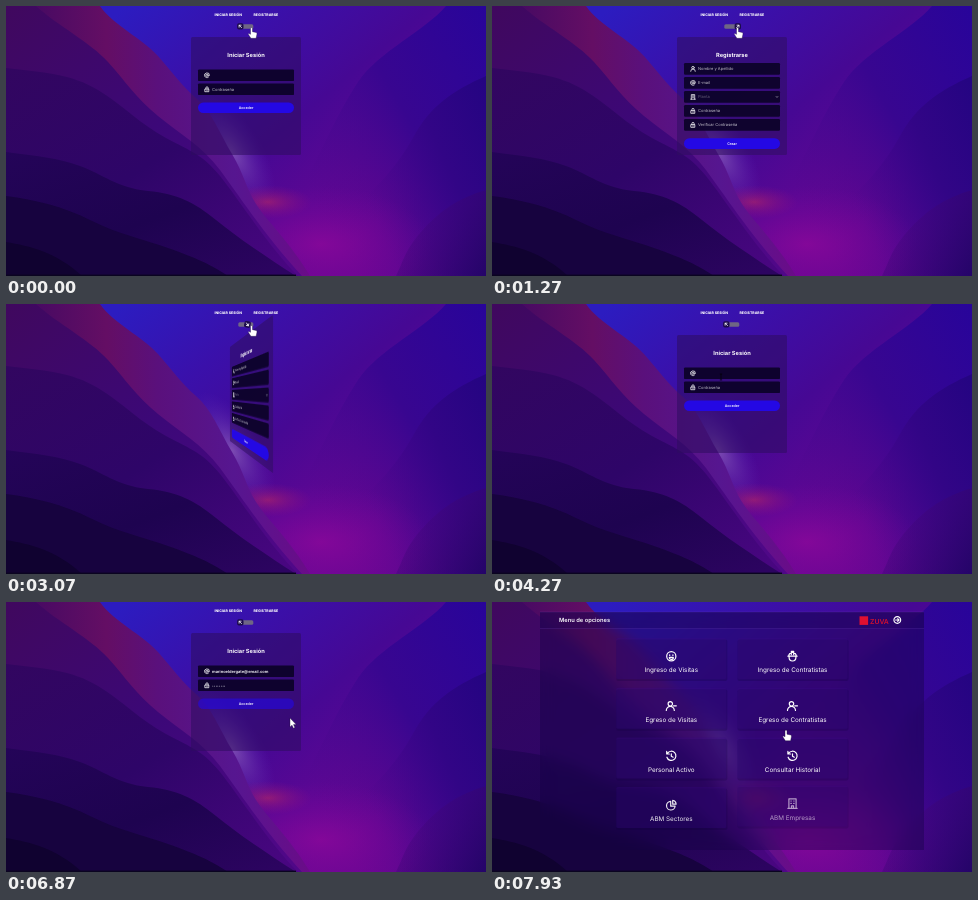
An HTML page that plays this animation: 480x270 px, repeating every 8 s.

```html
<!DOCTYPE html>
<html lang="es">
<head>
<meta charset="utf-8">
<title>Iniciar Sesión</title>
<style>
html, body { margin: 0; width: 100%; height: 100%; overflow: hidden; background: #1a0450; }
body { position: relative; }
svg, div { position: absolute; left: 0; top: 0; }
svg { width: 480px; height: 270px; font-family: Inter, "Open Sans", sans-serif; fill: #fff; text-rendering: geometricPrecision; }
.ic { fill: none; stroke: #fff; stroke-linecap: round; stroke-linejoin: round; }
#deck { left: 185px; top: 31px; width: 110px; height: 118px; perspective: 200px; }
#deck svg { width: 110px; height: 118px; }
#panel { left: 48px; top: 10px; width: 384px; height: 238px; background: rgba(20, 3, 68, .4); backdrop-filter: blur(7px); }
</style>
</head>
<body>
<svg viewBox="0 0 480 270">
  <defs>
    <linearGradient id="sky" gradientUnits="userSpaceOnUse" x1="120" y1="0" x2="330" y2="250">
      <stop offset="0" stop-color="#2c1cc0"/><stop offset=".3" stop-color="#3a10aa"/>
      <stop offset=".6" stop-color="#460894"/><stop offset="1" stop-color="#6c0692"/>
    </linearGradient>
    <linearGradient id="far">
      <stop offset="0" stop-color="#3c0862"/><stop offset=".33" stop-color="#640e64"/>
      <stop offset=".5" stop-color="#5a107c"/><stop offset=".75" stop-color="#561690"/><stop offset="1" stop-color="#6a0c88"/>
    </linearGradient>
    <linearGradient id="mid" x2=".9" y2="1">
      <stop offset="0" stop-color="#40085e"/><stop offset=".5" stop-color="#3c0878"/><stop offset="1" stop-color="#500888"/>
    </linearGradient>
    <linearGradient id="mid2" x2=".9" y2="1">
      <stop offset="0" stop-color="#320660"/><stop offset=".5" stop-color="#2e0568"/><stop offset="1" stop-color="#480680"/>
    </linearGradient>
    <linearGradient id="near" x2=".9" y2="1">
      <stop offset="0" stop-color="#240458"/><stop offset=".55" stop-color="#1e0350"/><stop offset="1" stop-color="#2c0460"/>
    </linearGradient>
    <linearGradient id="right" x1="1" x2=".1" y2=".8">
      <stop offset="0" stop-color="#28049a"/><stop offset=".5" stop-color="#380690"/><stop offset="1" stop-color="#50088e" stop-opacity="0"/>
    </linearGradient>
    <linearGradient id="right2" x1="1" x2=".1" y2=".6">
      <stop offset="0" stop-color="#240482"/><stop offset=".45" stop-color="#320586"/><stop offset="1" stop-color="#4c068c" stop-opacity="0"/>
    </linearGradient>
    <linearGradient id="corner" x1="1" y1="1" x2="0" y2=".4">
      <stop offset="0" stop-color="#240468"/><stop offset="1" stop-color="#48067e" stop-opacity=".2"/>
    </linearGradient>
    <radialGradient id="glow"><stop offset="0" stop-color="#8a5cb8" stop-opacity=".8"/><stop offset="1" stop-color="#5a20b0" stop-opacity="0"/></radialGradient>
    <radialGradient id="pink"><stop offset="0" stop-color="#88089a" stop-opacity=".85"/><stop offset="1" stop-color="#70069a" stop-opacity="0"/></radialGradient>
    <radialGradient id="red"><stop offset="0" stop-color="#b02468" stop-opacity=".65"/><stop offset="1" stop-color="#901080" stop-opacity="0"/></radialGradient>
  </defs>
  <rect width="480" height="270" fill="url(#sky)"/>
  <path d="M480 0H440C420 24 372 46 352 76S318 140 302 170L310 270H480Z" fill="url(#right)"/>
  <path d="M480 70C448 84 424 100 408 130S372 180 345 205L350 270H480Z" fill="url(#right2)"/>
  <ellipse cx="315" cy="238" rx="110" ry="58" fill="url(#pink)"/>
  <ellipse cx="226" cy="146" rx="66" ry="30" fill="url(#glow)" transform="rotate(58 226 146)"/>
  <ellipse cx="262" cy="196" rx="44" ry="17" fill="url(#red)"/>
  <path d="M480 184C452 192 432 206 415 226S398 254 390 270H480Z" fill="url(#corner)"/>
  <path d="M0 0H94C108 20 136 32 152 50S174 78 190 92S214 128 226 148S240 182 250 198S284 236 304 270H0Z" fill="url(#far)"/>
  <path d="M0 0H30C52 20 84 36 102 56S130 92 152 110S196 140 214 164S256 226 296 270H0Z" fill="url(#mid)"/>
  <path d="M0 62C36 66 66 68 92 84S134 118 160 132S196 148 214 170S262 240 292 270H0Z" fill="url(#mid2)"/>
  <path d="M0 146C30 150 52 152 74 160S112 182 142 185S188 196 210 214S262 252 290 270H0Z" fill="url(#near)"/>
  <path d="M0 190C30 194 56 200 84 214S134 232 162 242S204 258 222 270H0Z" fill="#17033f"/>
  <path d="M0 236C24 240 50 246 76 270H0Z" fill="#100230"/>
  <rect y="268.6" width="290" height="1.4" fill="#0a0420"/>
</svg>
<div id="login">
  <svg viewBox="0 0 480 270">
    <g font-size="3.55" font-weight="800" text-anchor="middle">
      <text x="222.2" y="10.4">INICIAR SESIÓN</text><text x="259.8" y="10.4">REGISTRARSE</text>
    </g>
    <rect x="232.3" y="18.3" width="15" height="4.4" rx="1.5" fill="#6f6684"/>
    <g id="knob"><rect x="-3.2" y="-3.2" width="6.4" height="6.4" rx="1.8" fill="#1c0a4c"/>
      <path class="ic" stroke-width=".8" d="M-1.2 1.2L1.2-1.2M-.8-1.2H1.2V.8"/></g>
  </svg>
  <div id="deck"><svg id="front" viewBox="185 31 110 118"></svg><svg id="rear" viewBox="185 31 110 118"></svg></div>
</div>
<div id="menu">
  <div id="panel"></div>
  <svg id="options" viewBox="0 0 480 270"></svg>
</div>
<svg viewBox="0 0 480 270"><g id="cursor"></g></svg>
<script>
const $ = id => document.getElementById(id);
const clamp = v => Math.max(0, Math.min(1, v));
const icon = (d, x, y, w = 1.2) => `<path class="ic" stroke-width="${w}" transform="translate(${x} ${y})" d="${d}"/>`;
const text = (s, x, y, size, more = '') => `<text x="${x}" y="${y}" font-size="${size}" ${more}>${s}</text>`;
const mid = 'text-anchor="middle"';

// Forms
const small = {
  at: 'M1.1 0A1.1 1.1 0 1 1 -1.1 0A1.1 1.1 0 1 1 1.1 0V.5Q1.8 1.4 2.4 0A2.4 2.4 0 1 0 1.2 2.1',
  lock: 'M-1.8-.3H1.8V2.4H-1.8ZM-1.1-.3V-1.4A1.1 1.1 0 0 1 1.1-1.4V-.3M0 .7V1.4',
  user: 'M1.3-1.2A1.3 1.3 0 1 1 -1.3-1.2A1.3 1.3 0 1 1 1.3-1.2M-2.3 2.4A2.3 2.3 0 0 1 2.3 2.4',
  house: 'M-1.7 2.3V-2.3H1.7V2.3M-2.3 2.3H2.3M-.6-1H.6M-.6.3H.6'
};
const field = (y, kind, label, dim = .75, id = '') =>
  `<rect x="192" y="${y}" width="96" height="11.7" rx="1.2" fill="#0b0328" fill-opacity=".93"/>` +
  icon(small[kind], 201, y + 5.9, .75) + text(label, 206, y + 7.3, 4.05, `fill-opacity="${dim}" ${id && `id="${id}"`}`);
const form = (title, fields, y, action) =>
  '<rect x="185" y="31" width="110" height="118" rx="1.5" fill="#2e0e60" fill-opacity=".55"/>' +
  text(title, 240, 51, 5.7, mid + ' font-weight="700"') + fields +
  `<rect class="button" x="192" y="${y}" width="96" height="10.6" rx="5.3" fill="#2408e4"/>` +
  text(action, 240, y + 6.5, 3.6, mid + ' font-weight="600"');

$('front').innerHTML = form('Iniciar Sesión',
  field(63.4, 'at', '', 1, 'mail') + field(77.4, 'lock', 'Contraseña', .75, 'pass'), 96.4, 'Acceder');
$('rear').innerHTML = form('Registrarse',
  field(57, 'user', 'Nombre y Apellido') + field(71, 'at', 'E-mail') + field(85, 'house', 'Planta', .35) +
  field(99, 'lock', 'Contraseña') + field(113, 'lock', 'Verificar Contraseña') +
  icon('M-.8-.4L0 .4L.8-.4', 285, 91, .5), 132.3, 'Crear');
$('mail').setAttribute('font-weight', 600);

// Menu
const person = 'M1.2-2.2A2.2 2.2 0 1 1 -3.2-2.2A2.2 2.2 0 1 1 1.2-2.2M-5 4.4A4 4 0 0 1 3 4.4M2.2-.2H5';
const clock = 'M-3.8-2.6A4.6 4.6 0 1 1 -4.4 1.4M-4.6-4.4V-1.8H-2M0-2V.4L1.8 1.4';
const items = [
  ['Ingreso de Visitas', 'M4.6 0A4.6 4.6 0 1 1 -4.6 0A4.6 4.6 0 1 1 4.6 0M-1.6-1.4V-.8M1.6-1.4V-.8M-2 1.2H2A2 2 0 0 1 -2 1.2'],
  ['Ingreso de Contratistas', 'M-4.6 0H4.6M-3.8 0A3.8 3.8 0 0 1 3.8 0M-3.4 0V1.4A3.4 3.4 0 0 0 3.4 1.4V0M-1.2-1.6V-4.8H1.2V-1.6'],
  ['Egreso de Visitas', person],
  ['Egreso de Contratistas', person],
  ['Personal Activo', clock],
  ['Consultar Historial', clock],
  ['ABM Sectores', 'M-.6-3.8A4.3 4.3 0 1 0 3.8 1H-.6ZM1.4-4.8A4 4 0 0 1 4.8-1H1.4Z'],
  ['ABM Empresas', 'M-3.6 4.8V-4.8H3.6V4.8M-4.6 4.8H4.6M-1.6-2.6H-1.2M1.2-2.6H1.6M-1.6-.2H-1.2M1.2-.2H1.6M-1 4.8V2.2H1V4.8']
];
$('options').innerHTML =
  '<rect x="48" y="10" width="384" height="16.5" fill="#1c0558" fill-opacity=".3"/>' +
  '<path d="M48 26.5H432M48 10H432" stroke="#7a50c0" stroke-opacity=".3" stroke-width=".6"/>' +
  text('Menu de opciones', 67, 20, 5.75, 'font-weight="600"') +
  '<rect x="367.5" y="14.3" width="8.6" height="8.6" fill="#e01030"/>' +
  text('ZUVA', 378, 22.2, 6.8, 'fill="#d01030" font-weight="600"') +
  icon('M3.4 0A3.4 3.4 0 1 1 -3.4 0A3.4 3.4 0 1 1 3.4 0M-1.7 0H1.7M.4-1.4L1.8 0L.4 1.4', 405.3, 18, 1.1) +
  items.map(([label, d], i) => {
    const x = i % 2 ? 300.5 : 179.3, y = 36 + 49.8 * (i >> 1);
    return '<g class="item">' +
      `<rect x="${x - 55}" y="${y + 1.5}" width="111" height="41.5" rx="2" fill="#10023c" fill-opacity=".22"/>` +
      `<rect x="${x - 55}" y="${y}" width="110" height="41" rx="1.5" fill="#3a0c86" fill-opacity=".3"/>` +
      icon(d, x, y + 18.2) + text(label, x, y + 34.4, 6.35, mid) + '</g>';
  }).join('');
const cards = [...document.querySelectorAll('.item')];
const button = document.querySelector('#front .button');

// Pointer shapes, hot spot at 0,0
const shapes = {
  hand: '<path fill="#fff" stroke="#201040" stroke-width=".4" d="M-1 .8Q0-.6 1 .8V4.2L4.8 5Q5.8 5.4 5.4 7L4.6 10.8H-.6L-3.2 6.8Q-3.2 5.4-1 6.8Z"/>',
  arrow: '<path fill="#fff" stroke="#201040" stroke-width=".4" d="M0 0V9L2 7.2L3.4 10.3L4.9 9.6L3.5 6.6H6.2Z"/>',
  beam: '<path fill="none" stroke="#000" stroke-width=".6" d="M-1.2-3H1.2M0-3V3M-1.2 3H1.2"/>'
};
const track = [
  [0, 245.5, 21.5, 'hand'], [3560, 245.5, 21.5, 'arrow'], [3720, 240, 45, 'arrow'], [3860, 229, 73, 'beam'],
  [4700, 229, 73, 'beam'], [4900, 222, 82, 'beam'], [5450, 219, 85, 'arrow'], [5800, 219, 85, 'arrow'],
  [6200, 242, 101, 'hand'], [6450, 242, 101, 'arrow'], [6800, 284, 116, 'arrow'], [7150, 284, 116, 'arrow'],
  [7500, 294, 128, 'hand'], [8000, 294, 128, 'hand']
];

// CSS ease-out
function easeOut(x) {
  let lo = 0, hi = 1, s;
  for (let i = 0; i < 16; i++) {
    s = (lo + hi) / 2;
    if (1.74 * s * s * (1 - s) + s ** 3 < x) lo = s; else hi = s;
  }
  return 3 * s * s * (1 - s) + s ** 3;
}

let shape;
function point(t) {
  const i = track.findLastIndex(k => k[0] <= t);
  const [t0, x0, y0, kind] = track[i], [t1, x1, y1] = track[i + 1];
  const p = (t - t0) / (t1 - t0), e = p * p * (3 - 2 * p);
  if (kind !== shape) $('cursor').innerHTML = shapes[shape = kind];
  $('cursor').setAttribute('transform', `translate(${x0 + (x1 - x0) * e} ${y0 + (y1 - y0) * e})`);
}

const start = performance.now();
function draw(now) {
  const t = Math.max(0, now - start) % 8000, inMenu = t >= 7060, filled = t >= 4800;
  $('login').style.display = inMenu ? 'none' : '';
  $('menu').style.display = inMenu ? '' : 'none';

  const flip = easeOut(clamp((t - 65) / 600)) - easeOut(clamp((t - 2920) / 600));
  const angle = 180 * flip;
  $('front').style.transform = `rotateY(${angle}deg)`;
  $('rear').style.transform = `rotateY(${angle - 180}deg)`;
  $('front').style.visibility = angle < 90 ? 'inherit' : 'hidden';
  $('rear').style.visibility = angle < 90 ? 'hidden' : 'inherit';
  $('knob').setAttribute('transform', `translate(${234.3 + 11.5 * flip} 20.4) rotate(${-90 - 270 * flip})`);

  $('mail').textContent = filled ? 'marinoeldergate@email.com' : '';
  $('pass').textContent = filled ? '••••••••' : 'Contraseña';
  $('pass').setAttribute('font-size', filled ? 3 : 4.05);
  $('pass').setAttribute('fill-opacity', filled ? 1 : .75);
  button.setAttribute('fill-opacity', 1 - .4 * clamp((t - 6400) / 300));

  $('panel').style.opacity = clamp((t - 7030) / 150);
  cards.forEach((card, i) => {
    const e = 1 - (1 - clamp((t - 7085 - 105 * i) / 300)) ** 2;
    card.setAttribute('opacity', e);
    card.setAttribute('transform', `translate(0 ${-5 * (1 - e)})`);
  });
  point(t);
  requestAnimationFrame(draw);
}
draw(start);
</script>
</body>
</html>
```
